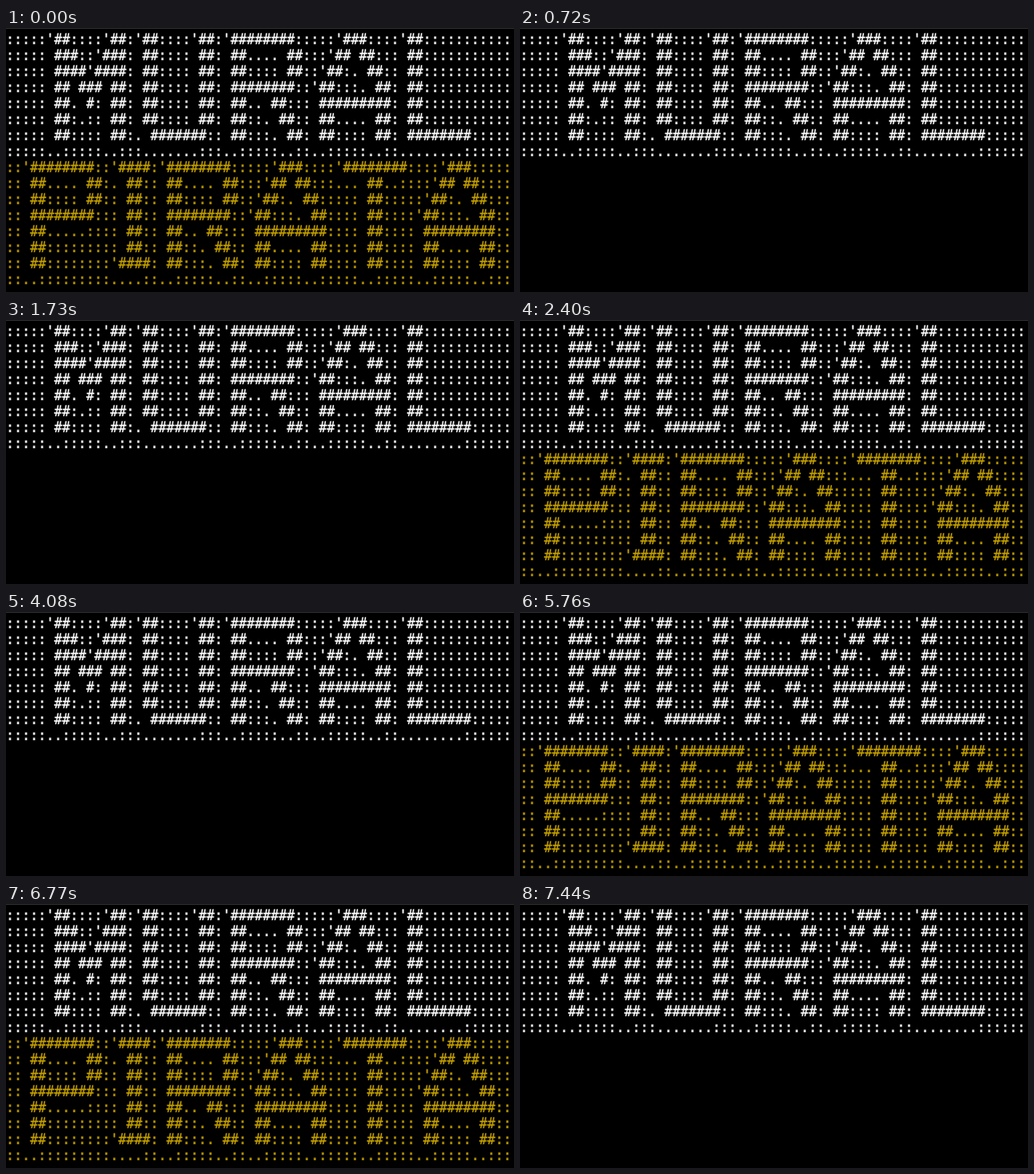
An HTML page that plays this animation: 570 px wide and 297 px high, repeating every 8 s.

```html
<!DOCTYPE html>
<html lang="pt">
<head>
<meta charset="utf-8">
<title>Mural Pirata</title>
<style>
html, body { margin: 0; width: 100%; height: 100%; overflow: hidden; background: #000; }
svg { display: block; width: 570px; height: 297px; }
text {
  font: 15px "DejaVu Sans Mono", "Liberation Mono", monospace;
  white-space: pre;
  stroke-width: .3px;
}
#top { fill: #fff; stroke: #fff; }
#bottom { fill: #c4a000; stroke: #c4a000; }
</style>
</head>
<body>
<svg viewBox="0 0 570 297">
  <rect width="570" height="297" fill="#000"/>
  <rect width="570" height="1" fill="#2b2b2b"/>
  <g id="top"></g>
  <g id="bottom"></g>
</svg>
<script>
const COLS = 63, CELL = 9, LINE = 18, BASE = 18;
const LOOP = 8000, FIRST = 720, HOLD = 1680;

const repeat = (row, n) => Array(n).fill(row);

// Block letters, eight rows each
const GLYPHS = {
  M: ["'##::::'##:", " ###::'###:", " ####'####:", " ## ### ##:",
      " ##. #: ##:", " ##:.:: ##:", " ##:::: ##:", "..:::::..::"],
  U: ["'##::::'##:", ...repeat(" ##:::: ##:", 5), ". #######::", ":.......:::"],
  R: ["'########::", " ##.... ##:", " ##:::: ##:", " ########::",
      " ##.. ##:::", " ##::. ##::", " ##:::. ##:", "..:::::..::"],
  A: [":::'###::::", "::'## ##:::", ":'##:. ##::", "'##:::. ##:",
      " #########:", " ##.... ##:", " ##:::: ##:", "..:::::..::"],
  L: ["'##:::::::", ...repeat(" ##:::::::", 5), " ########:", "........::"],
  P: ["'########::", " ##.... ##:", " ##:::: ##:", " ########::",
      " ##.....:::", ...repeat(" ##::::::::", 2), "..:::::::::"],
  I: ["'####:", ". ##::", ...repeat(": ##::", 4), "'####:", "....::"],
  T: ["'########:", "... ##..::", ...repeat("::: ##::::", 5), ":::..:::::"]
};

const cells = Array.from({ length: COLS }, (_, i) => i * CELL).join(" ");

function drawWord(id, word, indent, firstLine) {
  const group = document.getElementById(id);
  for (let r = 0; r < 8; r++) {
    const row = [...word].map(c => GLYPHS[c][r]).join("");
    const line = document.createElementNS("http://www.w3.org/2000/svg", "text");
    line.setAttribute("x", cells);
    line.setAttribute("y", BASE + (firstLine + r) * LINE);
    line.textContent = (":".repeat(indent) + row).padEnd(COLS, ":");
    group.append(line);
  }
  return group;
}

drawWord("top", "MURAL", 5, 0);
const blinker = drawWord("bottom", "PIRATA", 2, 8);

function render(time) {
  const t = time % LOOP;
  const phase = Math.floor((t - FIRST) / HOLD);
  blinker.setAttribute("visibility", phase % 2 ? "visible" : "hidden");
}

const start = performance.now();
function tick() {
  render(performance.now() - start);
  requestAnimationFrame(tick);
}
render(0);
requestAnimationFrame(tick);
</script>
</body>
</html>
```
